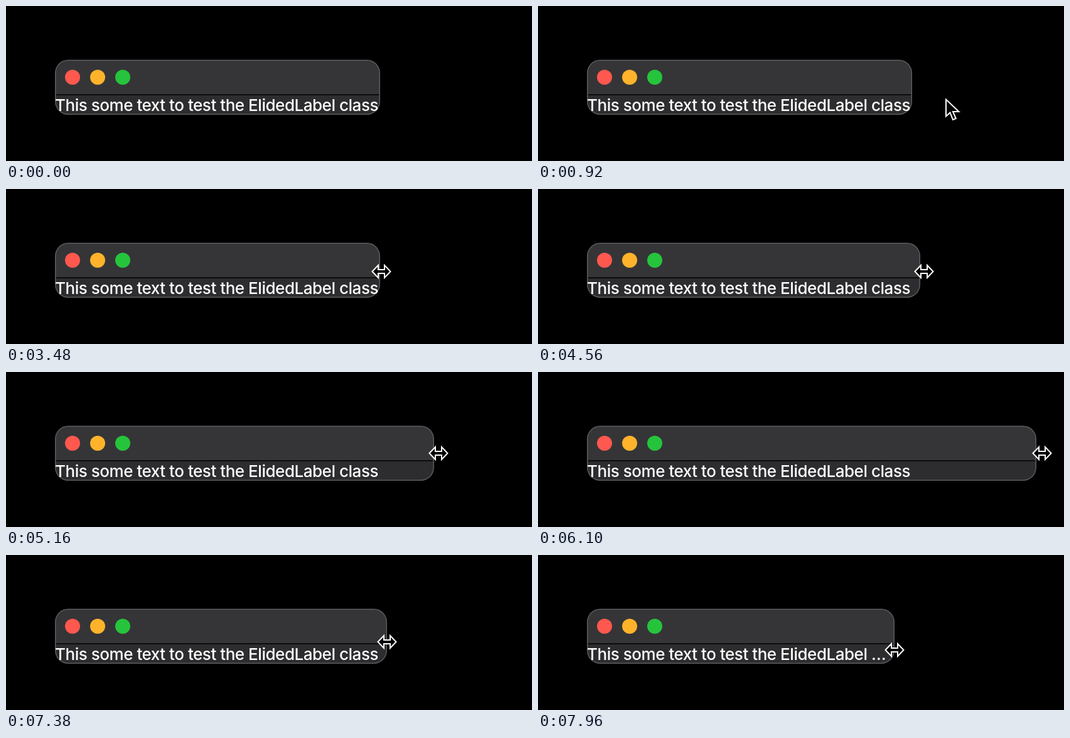
An HTML page that plays this animation: 838 px wide and 248 px high, repeating every 8 s.

```html
<!DOCTYPE html>
<html lang="en">
<head>
<meta charset="utf-8">
<title>Elided label demo</title>
<style>
  html, body { margin: 0; width: 100%; height: 100%; overflow: hidden; background: #000; }
  #stage { position: relative; width: 838px; height: 248px; overflow: hidden; }
  #win {
    position: absolute; left: 78px; top: 86px; height: 88px;
    border-radius: 21px; overflow: hidden;
    background: linear-gradient(#353537 55.5px, #0c0c0d 55.5px 57px, #2d2d2f 57px);
  }
  #win::after {
    content: ""; position: absolute; inset: 0; border-radius: inherit;
    box-shadow: inset 0 0 0 1.5px #5c5c60;
  }
  .dot { position: absolute; top: 16px; width: 24px; height: 24px; border-radius: 50%; }
  #label {
    position: absolute; left: 78px; top: 143px; height: 32px;
    overflow: hidden; white-space: nowrap; text-overflow: ellipsis;
    font: 500 26px/32px Inter, sans-serif; letter-spacing: -0.018em; color: #fff;
  }
  svg { position: absolute; left: 0; top: 0; }
  svg path { fill: #000; stroke: #fff; stroke-width: 2; }
</style>
</head>
<body>
<div id="stage">
  <div id="win">
    <div class="dot" style="left:16px;background:#ff584e"></div>
    <div class="dot" style="left:56px;background:#ffb32b"></div>
    <div class="dot" style="left:96px;background:#26c43c"></div>
  </div>
  <div id="label">This some text to test the ElidedLabel class</div>
  <svg width="838" height="248">
    <path id="arrow" d="M1 2.5V29.5L7.5 23.5L12 35L16.8 33L12 22H21.5Z"/>
    <path id="resize" d="M-14.5 0L-5-10V-3H5V-10L14.5 0L5 10V3H-5V10Z"/>
  </svg>
</div>
<script>
  const LOOP = 8000, GRAB = 2300, LEFT = 78, REST = 596;
  const $ = id => document.getElementById(id);
  const win = $('win'), label = $('label'), arrow = $('arrow'), resize = $('resize');

  const linear = p => p;
  const easeOut = p => 1 - (1 - p) ** 3;
  const smooth = p => p * p * (3 - 2 * p);

  // Moves a value through successive glides, resting between them.
  const glide = (value, t, moves) => moves.reduce((from, [start, end, to, ease]) =>
    from + (to - from) * ease(Math.min(1, Math.max(0, (t - start) / (end - start)))), value);

  const pointerX = t => glide(681, t, [
    [360, 800, 666, linear], [800, 1640, 621, easeOut], [1700, 2480, 598, smooth],
    [4425, 6615, 869, linear], [6615, 7560, 604, easeOut], [7600, 7920, 568, smooth]
  ]);
  const pointerY = t => glide(252, t, [
    [360, 800, 159, linear], [800, 1640, 127, easeOut], [1700, 2480, 132, smooth],
    [4425, 5160, 130, linear], [6615, 7560, 139, easeOut], [7600, 7920, 152, smooth]
  ]);
  // The window edge trails the pointer while it is dragged.
  const windowEdge = t => glide(REST, t, [
    [4453, 6640, 862, linear], [6660, 7560, 604, easeOut], [7600, 7920, 568, smooth]
  ]);

  // The picture updates every 40 ms and pauses at the end of each 840 ms block.
  function stepTime(t) {
    const phase = (t + 760) % 840;
    return Math.max(0, t - phase + Math.min(Math.floor(phase / 40) * 40, 720));
  }

  function draw(now) {
    const t = stepTime(now % LOOP);
    const edge = Math.round(windowEdge(t));
    const width = edge - LEFT + 'px';
    win.style.width = width;
    label.style.width = edge < REST ? width : 'max-content';

    const place = `translate(${Math.round(pointerX(t))} ${Math.round(pointerY(t))})`;
    arrow.setAttribute('transform', place);
    resize.setAttribute('transform', place);
    arrow.style.display = t < GRAB ? '' : 'none';
    resize.style.display = t < GRAB ? 'none' : '';
  }

  const start = performance.now();
  function tick() {
    draw(performance.now() - start);
    requestAnimationFrame(tick);
  }
  tick();
</script>
</body>
</html>
```
